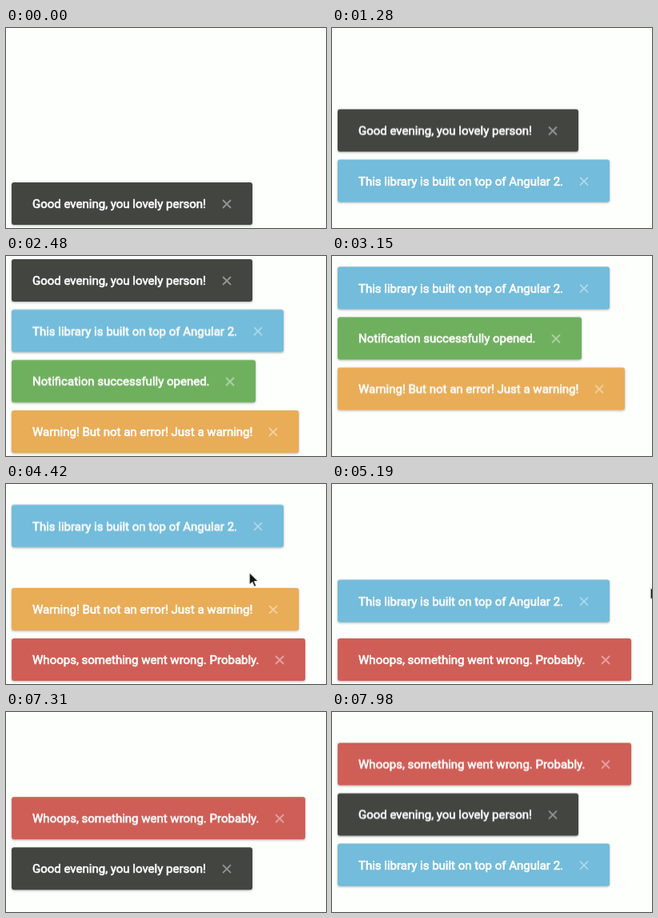
Animation, 400 px wide and 250 px high, one loop 8000 ms. Source, as an HTML page:

```html
<!DOCTYPE html>
<html lang="en">
<head>
<meta charset="utf-8">
<title>Notifications</title>
<style>
  html, body { margin: 0; width: 100%; height: 100%; overflow: hidden; }
  #stage { position: relative; width: 100%; height: 100%; overflow: hidden; contain: strict; background: #fdfffc; }
  .card {
    position: absolute; left: 7px; top: 193px; height: 53px; box-sizing: border-box;
    padding-left: 26px; border-radius: 3px; box-shadow: 0 1px 3px rgba(0, 0, 0, .3);
    font: 15px/55px Roboto, sans-serif; color: #fff; white-space: nowrap;
    -webkit-text-stroke: .65px #fff; will-change: transform;
  }
  .card svg { position: absolute; right: 26px; top: 21px; opacity: .43; }
  #cursor { position: absolute; left: 0; top: 0; overflow: visible; will-change: transform; }
</style>
</head>
<body>
<div id="stage">
  <svg id="cursor" width="14" height="20">
    <path d="M0 0V16.2L3.8 12.7L6.3 18.4L9 17.2L6.5 11.7H11.6Z" fill="#111" stroke="#fff" stroke-width="1.2"/>
  </svg>
</div>
<script>
const LOOP = 8000, STEP = 63, MOVE = 300, FADE = 220;

const KINDS = {
  dark: ['#434541', 301, 'Good evening, you lovely person!'],
  info: ['#73bcdb', 340, 'This library is built on top of Angular 2.'],
  success: ['#6fb05f', 305, 'Notification successfully opened.'],
  warning: ['#e9ac57', 359, 'Warning! But not an error! Just a warning!'],
  error: ['#cf5e56', 367, 'Whoops, something went wrong. Probably.']
};

// Times in ms: slide in, shifts up, shifts down, fade out
const CARDS = [
  { kind: 'dark', show: -MOVE, up: [420, 1200, 2035], down: [], hide: 2880 },
  { kind: 'info', show: 570, up: [1200, 2035, 2985], down: [4354, 5030], hide: 5540 },
  { kind: 'success', show: 1350, up: [2035, 2985], down: [], hide: 4195 },
  { kind: 'warning', show: 2185, up: [2985], down: [], hide: 4880 },
  { kind: 'error', show: 3135, up: [6575, 7240, 7900], down: [], hide: LOOP },
  { kind: 'dark', show: 6725, up: [7240, 7900], down: [], hide: LOOP },
  { kind: 'info', show: 7390, up: [7900], down: [], hide: LOOP }
];

// Pointer path: time, x, y
const PATH = [
  [3520, 398, 62], [3720, 336, 86], [4030, 280, 92], [4350, 280, 92],
  [4420, 304, 110], [4650, 332, 157], [4900, 332, 157], [5200, 400, 128]
];

const stage = document.getElementById('stage');
const cursor = document.getElementById('cursor');

for (const card of CARDS) {
  const [color, width, text] = KINDS[card.kind];
  card.width = width;
  card.el = document.createElement('div');
  card.el.className = 'card';
  card.el.style.cssText = `background:${color};width:${width}px`;
  card.el.innerHTML = text +
    '<svg width="12" height="12"><path d="M1 1L11 11M11 1L1 11" stroke="#fff" stroke-width="1.8"/></svg>';
  stage.insertBefore(card.el, cursor);
}

// CSS "ease": cubic-bezier(.25, .1, .25, 1)
function ease(x) {
  if (x <= 0) return 0;
  if (x >= 1) return 1;
  const bezier = (s, a, b) => 3 * (1 - s) ** 2 * s * a + 3 * (1 - s) * s * s * b + s ** 3;
  let lo = 0, hi = 1;
  for (let i = 0; i < 20; i++) {
    const mid = (lo + hi) / 2;
    if (bezier(mid, .25, .25) < x) lo = mid; else hi = mid;
  }
  return bezier(lo, .1, 1);
}

function placeCard(card, t) {
  const moved = times => times.reduce((sum, start) => sum + ease((t - start) / MOVE), 0);
  const x = (ease((t - card.show) / MOVE) - 1) * (card.width + 22);
  const y = (moved(card.down) - moved(card.up)) * STEP;
  const style = card.el.style;
  style.transform = `translate(${x}px, ${y}px)`;
  style.opacity = 1 - ease((t - card.hide) / FADE);
  style.visibility = t >= card.show && t < card.hide + FADE ? 'visible' : 'hidden';
}

function placeCursor(t) {
  const i = PATH.findIndex(point => point[0] > t);
  cursor.style.visibility = i > 0 ? 'visible' : 'hidden';
  if (i < 1) return;
  const [t0, x0, y0] = PATH[i - 1], [t1, x1, y1] = PATH[i];
  const k = (t - t0) / (t1 - t0);
  cursor.style.transform = `translate(${x0 + (x1 - x0) * k}px, ${y0 + (y1 - y0) * k}px)`;
}

const begin = performance.now();
function draw() {
  const t = (performance.now() - begin) % LOOP;
  CARDS.forEach(card => placeCard(card, t));
  placeCursor(t);
  requestAnimationFrame(draw);
}
draw();
</script>
</body>
</html>
```
